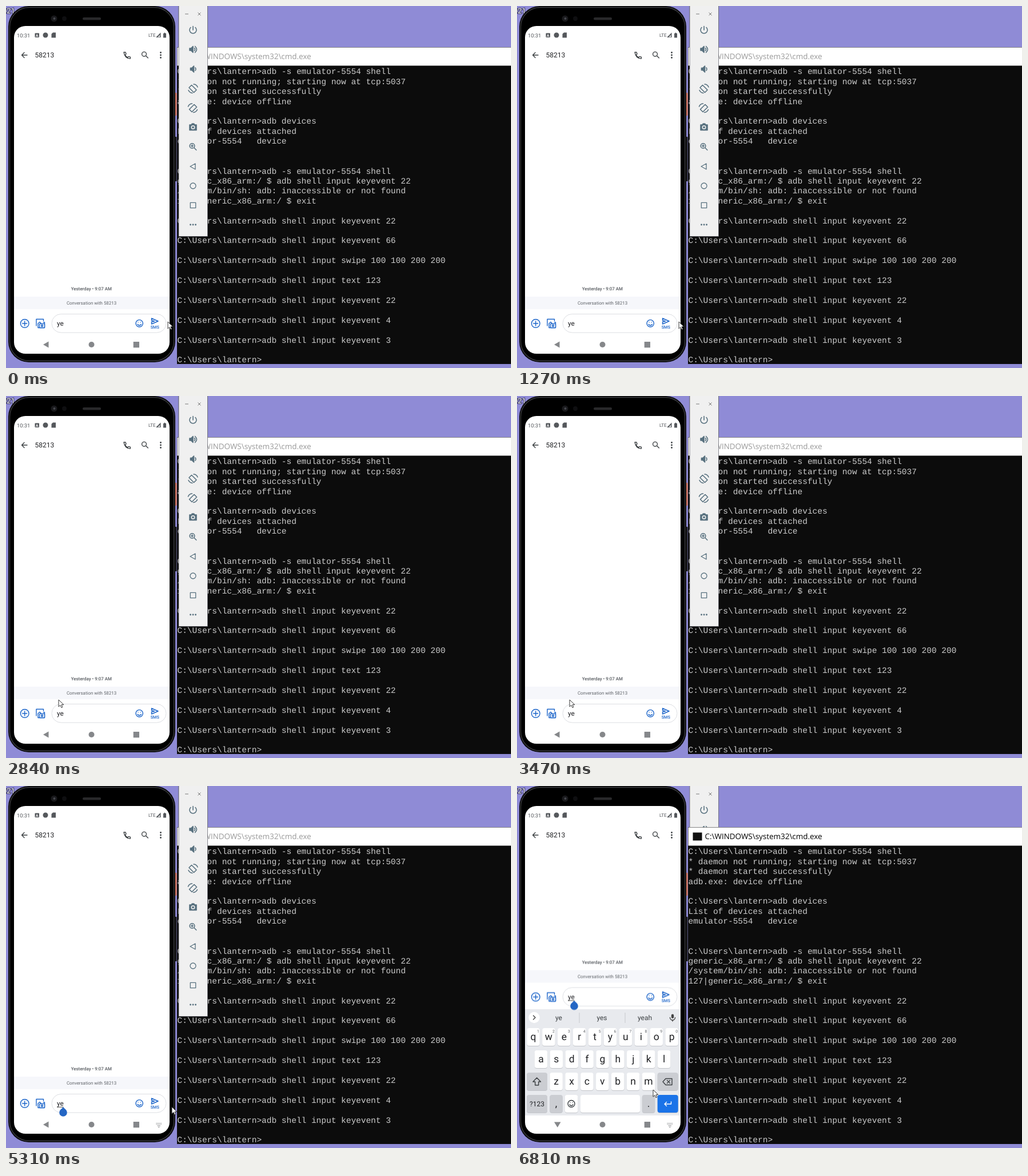
Write an HTML page that moves like this. It is 883 by 634 pixels and loops after 8 s.

```html
<!DOCTYPE html>
<html lang="en">
<head>
<meta charset="utf-8">
<title>Phone emulator and shell</title>
<style>
  html, body { margin: 0; width: 100%; height: 100%; overflow: hidden; background: #8f8bd6; }
  svg { display: block; width: 883px; height: 634px; text-rendering: geometricPrecision; }
  text { white-space: pre; font-family: Roboto, sans-serif; }
  .mono { font: 14.48px "Liberation Mono", monospace; fill: #ccc; }
  .title { font: 13.45px "Open Sans", sans-serif; }
  .mid { text-anchor: middle; }
  .line { fill: none; stroke: currentColor; stroke-width: 1.4; stroke-linecap: round; stroke-linejoin: round; }
  .timed { opacity: 0; }
</style>
</head>
<body>
<svg viewBox="0 0 883 634" xmlns="http://www.w3.org/2000/svg">
  <defs>
    <clipPath id="screen"><rect x="14" y="35" width="272" height="574" rx="20"/></clipPath>
    <path id="arrow" d="M0 0v12.2l2.9-2.7 2 4.300 2-.9-1.900-4.200h3.900z" fill="#fff" stroke="#222" stroke-width=".9"/>
  </defs>

  <rect width="883" height="634" fill="#8f8bd6"/>
  <text x="-6" y="13" font-size="13" fill="#fff" stroke="#3b3860" stroke-width="2" paint-order="stroke">021</text>

  <!-- phone body -->
  <rect x="294" y="152" width="4.500" height="40" rx="1" fill="#d8785f"/>
  <rect x="294" y="229" width="4.500" height="78" rx="1" fill="#18181a"/>
  <rect x="4" y="0" width="292" height="624" rx="36" fill="#0b0b0c"/>
  <rect x="6.500" y="2.500" width="287" height="619" rx="34" fill="#000" stroke="#3c3d40" stroke-width="1.300"/>
  <rect x="134" y="20" width="32" height="4.500" rx="2.200" fill="#29292b"/>
  <circle cx="84" cy="22" r="5.500" fill="#19191c"/>
  <circle cx="84.500" cy="22" r="2" fill="#45464c"/>
  <circle cx="102" cy="22" r="4" fill="#0e0e10"/>

  <g clip-path="url(#screen)">
    <rect x="14" y="35" width="272" height="574" fill="#fff"/>
    <!-- status bar -->
    <g fill="#55585c">
      <text x="19" y="54.500" font-size="9.300">10:31</text>
      <rect x="50.500" y="47.500" width="7.500" height="7.500" rx="1"/>
      <text class="mid" x="54.200" y="53.700" font-size="6.500" font-weight="700" fill="#fff">A</text>
      <circle cx="69" cy="51" r="4.500"/>
      <path d="M82 46.500h5v9h-7.500v-6.500z"/>
      <text x="249" y="54" font-size="8">LTE</text>
      <path d="M270.500 46.500v8.500h-8.500zM275 48h1.500v-1.300h2v1.300h1.500v7.500h-5z"/>
      <path d="M265.500 54.200l3.500-3.500v3.500z" fill="#fff"/>
    </g>
    <!-- app bar -->
    <g color="#3c4043">
      <path class="line" d="M37 86H27.500M32 81.500l-4.500 4.500 4.500 4.500"/>
      <text x="50.500" y="90.200" font-size="12" fill="#202124">58213</text>
      <path class="line" stroke-width="1.200" d="M206 81h3l1 3-1.700 1.800q1.700 3 4.400 4.200l1.700-1.600 3 1v2.700q-9.500.5-11.400-11.100z"/>
      <circle class="line" cx="241.500" cy="84.300" r="3.900"/>
      <path class="line" d="M244.500 87.300l3.800 3.800"/>
      <g id="more" fill="#3c4043"></g>
    </g>

    <!-- keyboard -->
    <g id="kb" class="timed">
      <rect x="14" y="391" width="272" height="186" fill="#e8eaee"/>
      <circle cx="30" cy="405.500" r="9.700" fill="#fff"/>
      <path class="line" color="#444" d="M28.500 402l3.500 3.500-3.500 3.500"/>
      <rect x="269.800" y="399.500" width="4.400" height="7.500" rx="2.200" fill="#444"/>
      <path class="line" color="#444" stroke-width="1.200" d="M267.500 405.500a4.500 4.500 0 0 0 9 0M272 410v2"/>
      <g id="words" class="timed" font-size="12" fill="#3c4043">
        <path d="M109 397v18M189 397v18" stroke="#c6c8cc"/>
      </g>
      <g id="keys"></g>
      <g class="line" color="#3c4043">
        <path d="M34.700 511l6.800 7h-3.800v6h-6v-6h-3.800z"/>
        <path d="M260 512.500h11v11h-11l-5-5.500zM262.500 515.500l5 5m0-5l-5 5"/>
        <circle cx="95" cy="556.500" r="6"/>
        <path d="M92 558q3 4 6 0M93 554.500v.1M97 554.500v.1"/>
        <path color="#fff" stroke="#fff" d="M269.500 553v4h-11M261.500 553.500l-3.500 3.500 3.500 3.500"/>
      </g>
    </g>

    <!-- conversation -->
    <g id="chat">
      <text class="mid" x="149.300" y="498" font-size="7.900" font-weight="500" fill="#55595e">Yesterday • 9:07 AM</text>
      <rect x="14" y="509" width="272" height="22" fill="#f6f7fb"/>
      <text class="mid" x="149.500" y="523" font-size="7.900" fill="#5f6368">Conversation with 58213</text>
      <rect x="80" y="539.500" width="200" height="32.500" rx="16.200" fill="#fff" stroke="#dcdee2"/>
      <text x="89" y="560" font-size="11.800" fill="#202124">ye</text>
      <g class="line" color="#1b64c9">
        <circle cx="32.700" cy="556" r="7.300"/>
        <path d="M28.700 556h8M32.700 552v8"/>
        <path d="M53 560v-11.500h12.500v3M56 560v3.500h11.500v-9.500h-2M56 559.500v-3.500l3-2.500 2 2"/>
        <rect x="58.500" y="556.500" width="9" height="7" rx="1" fill="#fff"/>
        <circle cx="63" cy="560" r="1.500"/>
        <circle cx="233.200" cy="555.800" r="6.200"/>
        <path d="M230 557.500q3.200 4 6.400 0M231 553.700v.1M235.400 553.700v.1"/>
        <path d="M254.500 547l11.500 5-11.500 5v-3.800l5-1.200-5-1.200z"/>
      </g>
      <text class="mid" x="260.300" y="565.300" font-size="7.300" font-weight="500" fill="#1b64c9">SMS</text>
      <g id="handle" class="timed">
        <path d="M89 562.300h11.500" stroke="#333" stroke-width=".9"/>
        <path d="M100 562.500l4.800 4.600a6.800 6.800 0 1 1-9.600 0z" fill="#2466c4"/>
      </g>
    </g>

    <!-- navigation -->
    <g fill="#85878a">
      <path id="back" class="timed" d="M65 593l9.500-5.500v11z"/>
      <path id="down" class="timed" d="M65 588.500h11.500l-5.700 9.500z"/>
      <circle cx="149.500" cy="593" r="5"/>
      <rect x="222.700" y="588" width="10.300" height="10.300"/>
      <g id="kbIcon" class="timed" fill="none" stroke="#85878a">
        <path d="M262.500 590.500h9.500M262.500 592.500h9.500" stroke-dasharray="1.200 .9"/>
        <path d="M264.500 595h5.500M266 597.500h2.500"/>
      </g>
    </g>
  </g>

  <!-- emulator toolbar -->
  <g id="bar">
    <rect x="302" y="-1" width="50.500" height="404.500" fill="#f0f0f0" stroke="#55555f" stroke-width=".7"/>
    <path class="line" color="#777" style="stroke-width:1" d="M313.500 14h5M335.800 11.800l4.400 4.400m0-4.400l-4.400 4.400"/>
    <g class="line" color="#58717f" style="stroke-width:1.600">
      <path d="M327 35.500v6.500M323 37.500a6 6 0 1 0 8 0"/>
      <path d="M321 74h2.500l3.500-3.500v11l-3.500-3.500h-2.500z" fill="#58717f"/>
      <path d="M329.500 73.500q2 2.500 0 5M330.500 70.500q6 5.500 0 11"/>
      <path d="M322.500 108.500h2.500l3.500-3.500v11l-3.500-3.500h-2.500z" fill="#58717f"/>
      <path d="M331 108q1.800 2.500 0 5"/>
      <path id="turn" d="M324.500 138.500l8.500 8.500-4.500 4.500-8.500-8.500zM328 137q5 0 7 5M326 152.500q-5-.5-7-5"/>
      <use href="#turn" transform="matrix(-1 0 0 1 653.500 34)"/>
      <path d="M321 208h3l1.500-2h3l1.500 2h3v9.500h-12z" fill="#58717f"/>
      <circle cx="327" cy="212.500" r="2.700" fill="#58717f" stroke="#f0f0f0"/>
      <circle cx="325.500" cy="245" r="4.300"/>
      <path d="M328.800 248.300l4 4M323.500 245h4M325.500 243v4"/>
      <g style="stroke-width:1.300">
        <path d="M322 281l9-5v10z"/>
        <circle cx="327" cy="315" r="5"/>
        <rect x="322.300" y="344.300" width="9.400" height="9.400"/>
      </g>
      <path d="M322.500 383h.1M327 383h.1M331.500 383h.1" style="stroke-width:2.800"/>
    </g>
  </g>

  <!-- terminal -->
  <rect x="299" y="72" width="584" height="555" fill="#0c0c0c"/>
  <rect x="299.500" y="72.500" width="584" height="32" fill="#fff"/>
  <g id="idle" class="timed"><text class="title" x="328.500" y="93" fill="#999">C:\WINDOWS\system32\cmd.exe</text></g>
  <g id="active" class="timed">
    <text class="title" x="328.500" y="93" fill="#000">C:\WINDOWS\system32\cmd.exe</text>
    <rect x="307.500" y="81.500" width="16" height="14" fill="#111"/>
  </g>
  <g id="shell"></g>
  <rect id="caret" class="timed" x="447.500" y="623.500" width="8.500" height="2.500" fill="#ccc"/>

  <use id="barTop" class="timed" href="#bar"/>
  <use id="mouse" class="timed" href="#arrow"/>
</svg>

<script>
  const LOOP = 8000, HANDLE = 5310, RAISE = 5840, WORDS = 6510, POINT = 6810;
  const $ = id => document.getElementById(id);

  function add(parent, tag, attrs, label) {
    const el = document.createElementNS('http://www.w3.org/2000/svg', tag);
    for (const name in attrs) el.setAttribute(name, attrs[name]);
    if (label) el.textContent = label;
    parent.append(el);
    return el;
  }

  // Console text
  const prompt = String.raw`C:\Users\lantern>`;
  const cmd = s => prompt + 'adb ' + s;
  const input = s => [cmd('shell input ' + s), ''];
  const log = [
    cmd('-s emulator-5554 shell'),
    '* daemon not running; starting now at tcp:5037',
    '* daemon started successfully',
    'adb.exe: device offline', '',
    cmd('devices'),
    'List of devices attached',
    'emulator-5554   device', '', '',
    cmd('-s emulator-5554 shell'),
    'generic_x86_arm:/ $ adb shell input keyevent 22',
    '/system/bin/sh: adb: inaccessible or not found',
    '127|generic_x86_arm:/ $ exit', '',
    ...['keyevent 22', 'keyevent 66', 'swipe 100 100 200 200', 'text 123',
        'keyevent 22', 'keyevent 4', 'keyevent 3'].flatMap(input),
    prompt
  ];
  log.forEach((s, i) => s && add($('shell'), 'text', { class: 'mono', x: 299.5, y: 119.3 + i * 17.42 }, s));

  for (const y of [81.5, 86, 90.5]) add($('more'), 'circle', { cx: 270.5, cy: y, r: 1.4 });

  // Keyboard
  function key(x, y, w, label = '', fill = '#fff', size = 17.5) {
    const keys = $('keys');
    add(keys, 'rect', { x: x - w / 2, y: y + 1, width: w, height: 31, rx: 4, fill: '#c3c5ca' });
    add(keys, 'rect', { x: x - w / 2, y, width: w, height: 31, rx: 4, fill });
    add(keys, 'text', { class: 'mid', x, y: y + 15.3 + size * .35, 'font-size': size, fill: '#202124' }, label);
  }
  const GREY = '#cbcdd2', PITCH = 26.9;
  [['qwertyuiop', 28.5, 424], ['asdfghjkl', 41.9, 463], ['zxcvbnm', 68.6, 502]].forEach(([row, x0, y]) =>
    [...row].forEach((c, i) => {
      const x = x0 + i * PITCH;
      key(x, y, 22.5, c);
      if (y === 424) add($('keys'), 'text', { class: 'mid', x: x + 8.5, y: 432, 'font-size': 6.8, fill: '#5f6368' }, (i + 1) % 10 + '');
    }));
  key(35, 502, 36, '', GREY);
  key(263.7, 502, 36, '', GREY);
  key(35, 541, 36, '?123', GREY, 12);
  key(68.5, 541, 22.5, ',', GREY);
  key(95, 541, 22.5);
  key(163, 541, 104);
  key(230, 541, 22.5, '.', GREY);
  key(263.7, 541, 36, '', '#1a73e8');
  [['ye', 73], ['yes', 148.5], ['yeah', 223.5]].forEach(([s, x]) =>
    add($('words'), 'text', { class: 'mid', x, y: 410 }, s));

  // Each step is [start, style]; it holds until the next one.
  function steps(id, list) {
    const frames = list.map(([t, style]) => ({ offset: t / LOOP, easing: 'step-end', ...style }));
    frames.push({ ...frames.at(-1), offset: 1 });
    $(id).animate(frames, { duration: LOOP, iterations: Infinity });
  }
  const show = (id, from, to = LOOP) => steps(id, [
    ...(from ? [[0, { opacity: 0 }]] : []),
    [from, { opacity: 1 }],
    ...(to < LOOP ? [[to, { opacity: 0 }]] : [])
  ]);
  const at = (x, y) => ({ opacity: 1, transform: `translate(${x}px, ${y}px)` });
  const gone = { opacity: 0, transform: 'translate(0px, 0px)' };

  for (const id of ['idle', 'barTop', 'back']) show(id, 0, RAISE);
  for (const id of ['active', 'kb', 'down']) show(id, RAISE);
  for (const id of ['handle', 'kbIcon']) show(id, HANDLE);
  show('words', WORDS);
  show('caret', WORDS, POINT);
  steps('chat', [[0, { transform: 'translate(0px, 0px)' }], [RAISE, { transform: 'translate(0px, -186.5px)' }]]);
  steps('mouse', [
    [0, at(283, 553)], [2770, at(92, 532)], [3700, gone],
    [HANDLE, at(290, 562)], [RAISE, gone], [POINT, at(238, 532)]
  ]);
</script>
</body>
</html>
```
